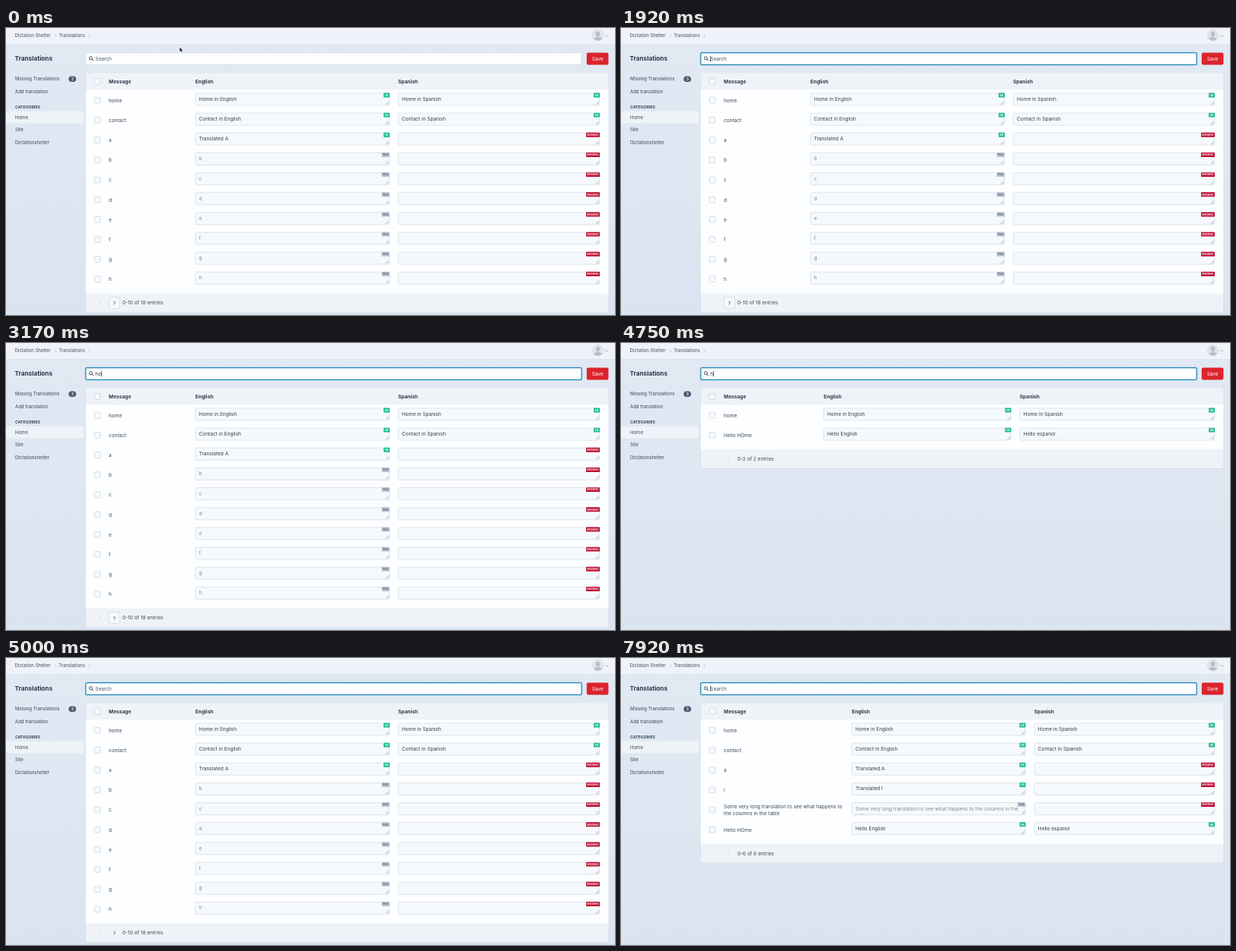
Write an HTML page that moves like this. It is 800x378 px and loops after 8000 ms.

```html
<!DOCTYPE html>
<html lang="en">
<head>
<meta charset="utf-8">
<title>Translations</title>
<style>
  html, body { margin: 0; width: 100%; height: 100%; overflow: hidden; background: #dde6f1; }
  svg { display: block; }
  text { font-family: Inter, Roboto, sans-serif; font-size: 6.5px; fill: #3a4655; white-space: pre; }
</style>
</head>
<body>
<svg id="stage" width="100%" height="100%" viewBox="0 0 800 378">
  <defs>
    <linearGradient id="backdrop" x2="0" y2="1">
      <stop stop-color="#e1e9f3"/><stop offset="1" stop-color="#dae4f0"/>
    </linearGradient>
    <clipPath id="face"><circle cx="777.5" cy="9.7" r="7.2"/></clipPath>
  </defs>
  <g id="chrome"></g>
  <g id="search"></g>
  <g id="table"></g>
  <path id="pointer" d="M0 0V6.5L1.5 5.2L2.5 7.5L3.7 7L2.7 4.8H4.7Z" fill="#111" stroke="#fff" stroke-width=".6"/>
</svg>
<script>
const LOOP = 8000, PITCH = 26.17, FIRST_ROW = 85.6, FIELD_HEIGHT = 16.6;
const $ = id => document.getElementById(id);

// Text placed by its left edge and vertical centre.
const label = (x, y, text, { size = 6.5, weight = 400, fill = '#3a4655', anchor = 'start' } = {}) =>
  `<text x="${x}" y="${y + size * .36}" text-anchor="${anchor}"
    style="font-size:${size}px;font-weight:${weight};fill:${fill}">${text}</text>`;

const box = (x, y, w, h, fill, stroke = 'none', r = 1.5, line = .6) =>
  `<rect x="${x}" y="${y}" width="${w}" height="${h}" rx="${r}" fill="${fill}" stroke="${stroke}" stroke-width="${line}"/>`;

const stroke = (d, color, width = .7) =>
  `<path d="${d}" fill="none" stroke="${color}" stroke-width="${width}" stroke-linecap="round" stroke-linejoin="round"/>`;

const chevron = (x, y, color, s = 1.8, width = .8) =>
  stroke(`M${x - s / 2} ${y - s}l${s} ${s}l${-s} ${s}`, color, width);

const checkbox = y => box(116.1, y - 3.8, 7.7, 7.7, '#f8fafc', '#b6c4d4', 1.2);

const BADGES = {
  DB: [8, '#17bb8c', '#fff'],
  FILE: [10.5, '#b8c4d2', '#4c5a6c'],
  MISSING: [18, '#bd0a31', '#fff']
};

function field(x, y, right, lines, kind) {
  const width = right - x;
  const [badgeWidth, back, ink] = BADGES[kind];
  const color = kind === 'FILE' ? '#7d8897' : '#2f3b4b';
  return box(x + .3, y + .3, width - .6, FIELD_HEIGHT - .6, '#f6f9fc', '#c8d4e1')
    + `<svg x="${x}" y="${y}" width="${width}" height="${FIELD_HEIGHT - .6}">`
    + lines.map((line, i) => label(5, 8 + i * 9.2, line, { fill: color })).join('') + '</svg>'
    + stroke(`M${right - 5} ${y + 15}l3.5 -3.5M${right - 2.7} ${y + 15}l1.2 -1.2`, '#687586', .5)
    + box(right - badgeWidth, y - .1, badgeWidth, 5.9, back, 'none', .7)
    + label(right - badgeWidth / 2, y + 2.9, kind, { size: 3.6, weight: 600, fill: ink, anchor: 'middle' });
}

const home = { message: ['home'], english: ['Home in English'], spanish: 'Home in Spanish' };
const contact = { message: ['contact'], english: ['Contact in English'], spanish: 'Contact in Spanish' };
const hello = { message: ['Hello HOme'], english: ['Hello English'], spanish: 'Hello espanol' };
const translated = c => ({ message: [c], english: ['Translated ' + c.toUpperCase()] });
const untouched = c => ({ message: [c], english: [c], file: true });
const long = {
  message: ['Some very long translation to see what happens to', 'the columns in the table'],
  english: ['Some very long translation to see what happens to the columns in the', 'table'],
  file: true
};

const allRows = [home, contact, translated('a'), ...[...'bcdefgh'].map(untouched)];
const TABLES = {
  all: { rows: allRows, english: [248.6, 504], spanish: 515, count: '0-10 of 18', next: 'button' },
  reloaded: { rows: allRows, english: [248.6, 504], spanish: 515, count: '0-10 of 18', next: 'plain' },
  home: { rows: [home, hello], english: [266, 512.5], spanish: 523.8, count: '0-2 of 2' },
  a: {
    rows: [home, contact, translated('a'), translated('i'), long, hello],
    english: [303, 531.5], spanish: 542.8, count: '0-6 of 6'
  }
};

function drawTable({ rows, english, spanish, count, next }) {
  const foot = 81.2 + rows.length * PITCH + 6.5;
  const middle = foot + 12.6;
  const heading = { size: 6.6, weight: 700, fill: '#303c4c' };
  const body = rows.map((row, i) => {
    const y = FIRST_ROW + i * PITCH, centre = y + 9.8;
    const lines = row.message;
    return checkbox(centre - .2)
      + lines.map((line, n) => label(135, centre + (n - (lines.length - 1) / 2) * 9.3, line)).join('')
      + field(english[0], y, english[1], row.english, row.file ? 'FILE' : 'DB')
      + field(spanish, y, 780, [row.spanish || ''], row.spanish ? 'DB' : 'MISSING');
  }).join('');
  return box(104.5, 59.6, 687.2, foot - 34.2, '#c9d5e3', 'none', 2)
    + box(104.8, 59.2, 686.6, foot - 34.2, '#eff3f8', 'none', 2)
    + `<rect x="104.8" y="81.2" width="686.6" height="${foot - 81.2}" fill="#fdfeff"/>`
    + checkbox(70.5)
    + label(135, 70.5, 'Message', heading)
    + label(english[0] + .2, 70.5, 'English', heading)
    + label(spanish, 70.5, 'Spanish', heading)
    + body
    + chevron(123.5, middle, '#ccd5e0')
    + (next === 'button' ? box(135.2, middle - 7.6, 14.4, 15.2, '#f5f8fb', '#c3cfdd') : '')
    + chevron(142.6, middle, next ? '#344152' : '#c3cdd9', 1.8, next ? .9 : .8)
    + label(153, middle, count + ' entries');
}

function drawChrome() {
  const crumb = { size: 6, fill: '#3f4b5b' }, side = { size: 6.05 };
  return '<rect width="800" height="378" fill="url(#backdrop)"/>'
    + '<rect width="800" height="21.3" fill="#eff3f9"/><rect y="21.3" width="800" height=".6" fill="#d2dce8"/>'
    + label(11.6, 10.3, 'Dictation Shelter', crumb) + chevron(65.3, 10.3, '#98a5b5', 1.6, .6)
    + label(69.3, 10.3, 'Translations', crumb) + chevron(109.7, 10.3, '#98a5b5', 1.6, .6)
    + '<g clip-path="url(#face)"><rect x="770" y="2" width="15" height="16" fill="#e1e5ea"/>'
    + '<ellipse cx="777.5" cy="8" rx="2.7" ry="3.4" fill="#b7bec8"/>'
    + '<ellipse cx="777.5" cy="16" rx="6" ry="4" fill="#b7bec8"/></g>'
    + '<circle cx="777.5" cy="9.7" r="7.2" fill="none" stroke="#cbd2db" stroke-width=".5"/>'
    + stroke('M787.4 9.4l1.9 1.9l1.9 -1.9', '#8795a7')
    + label(11.5, 40.2, 'Translations', { size: 8.2, weight: 700, fill: '#2d3948' })
    + label(12, 67.3, 'Missing Translations', side)
    + box(82.3, 63.4, 9.8, 7.6, '#4d5b6e', 'none', 3.8)
    + label(87.2, 67.2, '3', { size: 4.8, weight: 600, fill: '#fff', anchor: 'middle' })
    + label(12, 84, 'Add translation', side)
    + label(12, 103.8, 'CATEGORIES', { size: 5.2, weight: 700 })
    + box(0, 109.6, 102, 16, '#eef3f8', 'none', 1.2)
    + label(12, 117.6, 'Home', side) + label(12, 134.2, 'Site', side) + label(12, 151, 'Dictationshelter', side)
    + box(762.8, 32.6, 28.6, 15.8, '#dc242d', 'none', 2)
    + label(777.1, 40.5, 'Save', { size: 6.4, fill: '#fff', anchor: 'middle' });
}

function drawSearch(focused, text) {
  return (focused
    ? box(104.6, 32.5, 651.7, 16, '#fcfdfe', '#a9d0e5', 2, 2.2) + box(104.8, 32.7, 651.3, 15.6, '#fcfdfe', '#2589b9', 1.6, 1.2)
    : box(104.8, 32.7, 651, 15.6, '#fcfdfe', '#c9d5e2'))
    + '<circle cx="111.4" cy="39.7" r="2" fill="none" stroke="#303c4c" stroke-width=".9"/>'
    + stroke('M113 41.3l1.6 1.6', '#303c4c', 1)
    + `<g id="query">${label(117.3, 40.5, text || 'Search', { fill: text ? '#2f3b4b' : '#4a5565' })}</g>`
    + '<rect id="caret" y="36.6" width=".7" height="7.8" fill="#1d2733"/>';
}

// [time, focused, query, table, caret blink origin if not the time]
const STATES = [
  [0, false, '', 'all'],
  [1750, true, '', 'all'],
  [2920, true, 'h', 'all'],
  [3120, true, 'ho', 'all'],
  [3220, true, 'hom', 'all'],
  [3320, true, 'home', 'all'],
  [3480, true, 'home', 'home'],
  [4520, true, 'hom', 'home'],
  [4600, true, 'ho', 'home'],
  [4690, true, 'h', 'home'],
  [4780, true, '', 'home'],
  [4960, true, '', 'reloaded', 5250],
  [5600, true, 'a', 'reloaded'],
  [5830, true, 'a', 'a'],
  [7800, true, '', 'a']
];

const POINTER_PATH = [[250, 228, 25], [960, 285.5, 9.8], [1100, 285.5, 9.8], [1720, 212, 38]];

function pointerAt(t) {
  const next = POINTER_PATH.findIndex(p => p[0] > t);
  if (next < 1) return POINTER_PATH[next ? POINTER_PATH.length - 1 : 0].slice(1);
  const [t0, x0, y0] = POINTER_PATH[next - 1], [t1, x1, y1] = POINTER_PATH[next];
  const u = (t - t0) / (t1 - t0), e = u * u * (3 - 2 * u);
  return [x0 + (x1 - x0) * e, y0 + (y1 - y0) * e];
}

let shownState, shownTable, caretX;

function render(t) {
  const state = STATES.findLast(s => s[0] <= t);
  const [since, focused, query, table, blink = since] = state;
  if (state !== shownState) {
    shownState = state;
    $('search').innerHTML = drawSearch(focused, query);
    caretX = query ? 117.5 + $('query').firstChild.getComputedTextLength() : 117.3;
    $('caret').setAttribute('x', caretX);
  }
  if (table !== shownTable) {
    shownTable = table;
    $('table').innerHTML = drawTable(TABLES[table]);
  }
  const caretOn = focused && (t - blink + LOOP) % 1000 < 500;
  $('caret').setAttribute('visibility', caretOn ? 'visible' : 'hidden');
  $('pointer').setAttribute('visibility', t < 1840 ? 'visible' : 'hidden');
  $('pointer').setAttribute('transform', `translate(${pointerAt(t)})`);
}

$('chrome').innerHTML = drawChrome();
const start = performance.now();
function tick() {
  render((performance.now() - start) % LOOP);
  requestAnimationFrame(tick);
}
tick();
</script>
</body>
</html>
```
